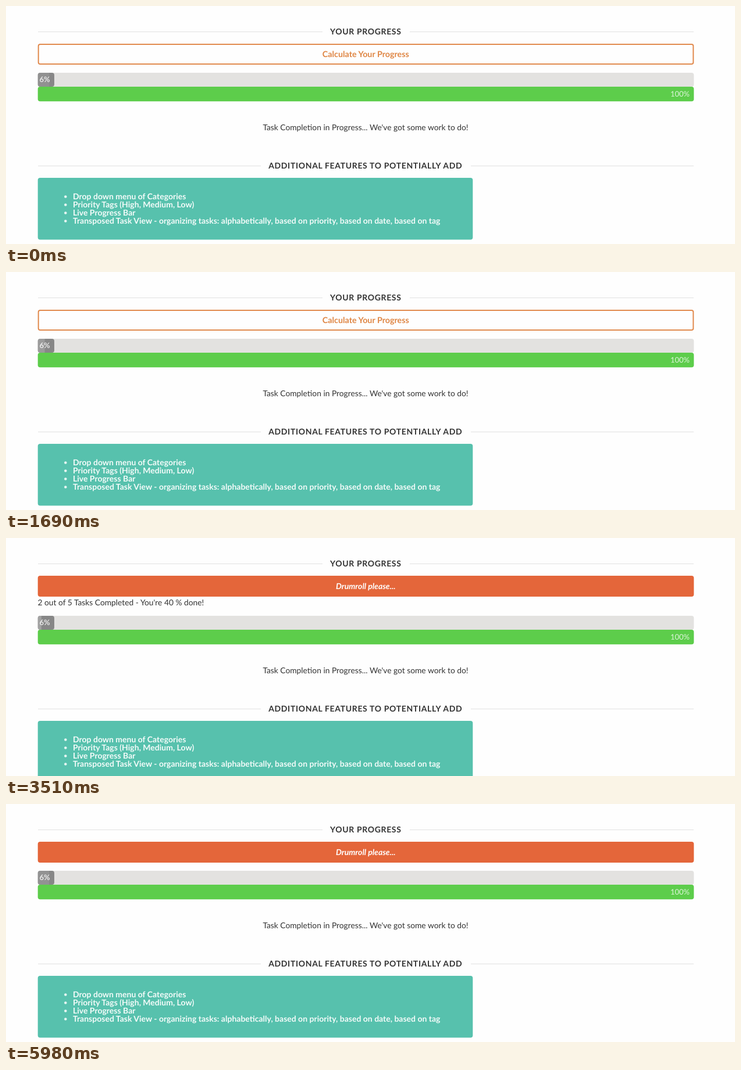
An HTML page for the animation above (6110 ms loop, 1253 by 410 pixels).

```html
<!DOCTYPE html>
<html lang="en">
<head>
<meta charset="utf-8">
<title>Task progress</title>
<style>
  html, body { margin: 0; width: 100%; height: 100%; overflow: hidden; background: #fefefe; }
  svg { display: block; width: 1253px; height: 410px; }
  text { font: 13.8px Lato, sans-serif; fill: #333; text-rendering: geometricPrecision; }
  .mid { text-anchor: middle; }
  .bold, .head { font-size: 14px; font-weight: 700; }
  .head { letter-spacing: .046em; }
  .rule { stroke: #e1e1e1; }
  .percent { font-size: 13px; fill: #fff; fill-opacity: .8; }
  .label { transform-origin: 618px 83px; }
  #idle { font-size: 14.3px; fill: #df8644; }
  #drum { font-style: italic; fill: #fff; }
  #list text { fill: #f3fbf9; }
  #list circle { fill: #e6f6f2; }
</style>
</head>
<body>
<svg viewBox="0 0 1253 410">
  <clipPath id="barShape"><rect x="54.7" y="115" width="28.3" height="24" rx="4"/></clipPath>

  <path class="rule" d="M55 44.5H544M694 44.5H1182"/>
  <text class="mid head" x="618.3" y="49">YOUR PROGRESS</text>

  <rect id="button" x="55.7" y="66" width="1125.6" height="34" rx="3" stroke-width="2"/>
  <text id="idle" class="mid bold label" x="618.3" y="88">Calculate Your Progress</text>
  <text id="drum" class="mid bold label" x="618.3" y="88">Drumroll please...</text>
  <text id="result" x="54.5" y="116">2 out of 5 Tasks Completed - You're 40 % done!</text>

  <g id="below">
    <rect x="54.7" y="115" width="1127.6" height="24" rx="4" fill="#e3e2e0"/>
    <rect x="54.7" y="115" width="28.3" height="24" rx="4" fill="#878787"/>
    <g clip-path="url(#barShape)">
      <rect id="shine" x="54.7" y="115" height="24" fill="#fff"/>
    </g>
    <text class="percent bold" x="57.5" y="131">6%</text>
    <rect x="54.7" y="139" width="1127.6" height="25.2" rx="4" fill="#5dcd4b"/>
    <text class="percent" x="1175" y="156" text-anchor="end">100%</text>

    <text class="mid" x="618" y="214">Task Completion in Progress... We've got some work to do!</text>

    <path class="rule" d="M55 275.5H438M799 275.5H1182"/>
    <text class="mid head" x="617.7" y="280">ADDITIONAL FEATURES TO POTENTIALLY ADD</text>

    <rect id="panel" x="54.7" y="296" width="747.6" height="106.4" rx="4"/>
    <g id="list"></g>
  </g>
</svg>
<script>
  // LEAD makes up for the delay of a painted frame at the edge of a tick.
  const LOOP = 6110, TICK = 130, LEAD = 30, SHINE_LEAD = 820;
  const $ = id => document.getElementById(id);

  const items = [
    'Drop down menu of Categories',
    'Priority Tags (High, Medium, Low)',
    'Live Progress Bar',
    'Transposed Task View - organizing tasks: alphabetically, based on priority, based on date, based on tag'
  ];
  $('list').innerHTML = items.map((item, i) => {
    const y = 333 + i * 14;
    return `<circle cx="102.3" cy="${y - 4.5}" r="2.3"/><text class="bold" x="115" y="${y}">${item}</text>`;
  }).join('');

  // Each step [ms, style] holds until the next one.
  function hold(id, steps) {
    const frames = steps.map(([ms, style]) => ({ ...style, offset: ms / LOOP, easing: 'steps(1, end)' }));
    frames.push({ ...steps[steps.length - 1][1], offset: 1 });
    const anim = $(id).animate(frames, { duration: LOOP, fill: 'both' });
    anim.pause();
    return anim;
  }

  const paint = (fill, stroke = fill) => ({ fill, stroke });
  const look = (opacity, scale) => ({ opacity, transform: `scale(${scale})` });
  const teal = '#57c1ad', midTeal = '#50b4a1', darkTeal = '#49a695';

  const scenes = [
    hold('panel', [
      [0, { fill: teal }], [910, { fill: midTeal }], [1040, { fill: darkTeal }],
      [1560, { fill: midTeal }], [1690, { fill: teal }]
    ]),
    hold('button', [
      [0, paint('#fefefe', '#e18a4e')], [2210, paint('#e98a51')], [2340, paint('#e4663a')]
    ]),
    hold('idle', [
      [0, { ...look(1, 1), fill: '#df8644' }],
      [2210, { ...look(.3, .83), fill: '#fff' }],
      [2340, { ...look(0, .75), fill: '#fff' }]
    ]),
    hold('drum', [[0, look(0, 1.5)], [2210, look(.6, 1.17)], [2340, look(1, 1)]]),
    hold('result', [[0, { opacity: 0 }], [3120, { opacity: 1 }], [4290, { opacity: 0 }]]),
    hold('below', [
      [0, { transform: 'translateY(0px)' }],
      [3120, { transform: 'translateY(19px)' }],
      [4290, { transform: 'translateY(0px)' }]
    ])
  ];

  const shine = $('shine').animate(
    [{ width: '0px', opacity: .3, easing: 'ease' }, { width: '28.3px', opacity: 0 }],
    { duration: 2000, iterations: Infinity }
  );
  shine.pause();

  const start = performance.now();
  function draw(now) {
    const elapsed = (Math.max(0, now - start) + LEAD) % LOOP;
    const t = Math.floor(elapsed / TICK) * TICK;
    // The middle of a tick stays clear of rounding at the step edges.
    for (const scene of scenes) scene.currentTime = t + TICK / 2;
    shine.currentTime = t + SHINE_LEAD;
    requestAnimationFrame(draw);
  }
  draw(start);
</script>
</body>
</html>
```
